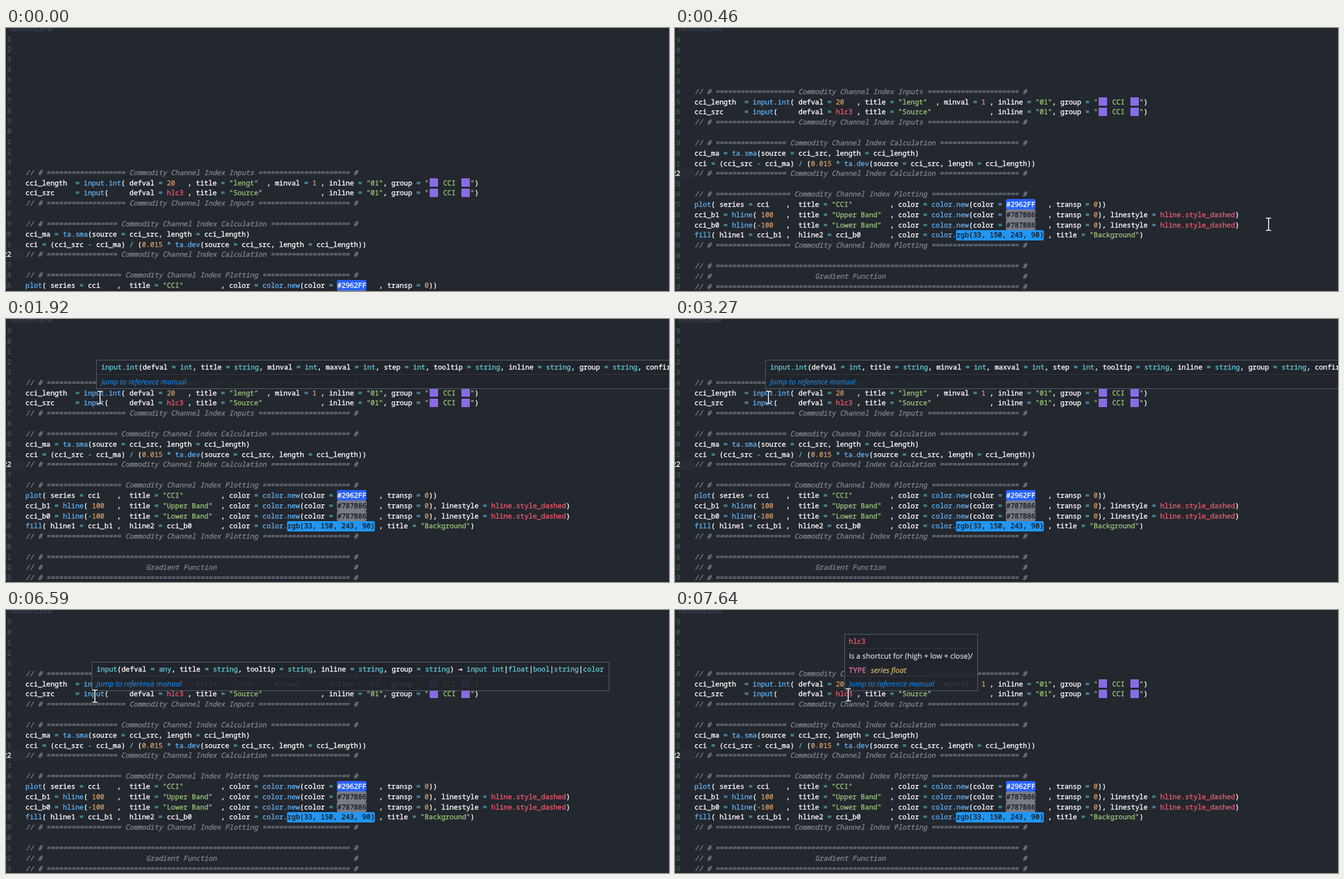
Animation of 1022x406 px, one loop 8 s. Source, as an HTML page:

```html
<!DOCTYPE html>
<html lang="en">
<head>
<meta charset="utf-8">
<title>Editor hover hints</title>
<style>
  html, body { margin: 0; width: 100%; height: 100%; overflow: hidden; background: #23272e; }
  svg { display: block; width: 100vw; height: 100vh; }
  text { white-space: pre; text-rendering: geometricPrecision; }
  .mono { font: 10.683px "Noto Sans Mono", "DejaVu Sans Mono", monospace; stroke-width: .32px; }
  .ui { font: 11.4px "Open Sans", "Noto Sans", sans-serif; stroke-width: .15px; }
  .italic { font-style: italic; }
  .link { font-size: 11.5px; font-style: italic; }
  .strong { font-weight: 600; }
  .arrow { font-family: "DejaVu Sans Mono", monospace; }
</style>
</head>
<body>
<svg viewBox="0 0 1022 406" xmlns="http://www.w3.org/2000/svg">
  <defs><clipPath id="pane"><rect y="10" width="1022" height="396"/></clipPath></defs>
  <rect width="1022" height="406" fill="#23272e"/>
  <text class="ui" x="5" y="5" style="font-size:10.1px" fill="#465068">functions.pine</text>
  <g clip-path="url(#pane)"><g id="code"></g></g>
  <g id="hints"></g>
  <g id="cursor">
    <path d="M-4-9.5H-1.2L0-8.6 1.2-9.5H4M0-8.6V8.6M-4 9.5H-1.2L0 8.6 1.2 9.5H4" fill="none" stroke="#14171b" stroke-width="3.2"/>
    <path d="M-4-9.5H-1.2L0-8.6 1.2-9.5H4M0-8.6V8.6M-4 9.5H-1.2L0 8.6 1.2 9.5H4" fill="none" stroke="#fff" stroke-width="1.5"/>
  </g>
</svg>
<script>
const CHAR = 6.41, LINE = 15.84, LEFT = 30, LOOP = 8000, TICK = 200 / 3;
const C = {
  plain: '#ffffff', op: '#56b6c2', fn: '#61afef', num: '#d19a66', str: '#98c379',
  red: '#ef596f', comment: '#7f848e', gutter: '#495162', link: '#1480e4', type: '#62c6d4'
};
const $ = id => document.getElementById(id);
const nbsp = s => s.replace(/ /g, '\u00a0');
const rowY = row => 98 + (row - 14) * LINE;

// Text sits on whole-pixel baselines; a hairline stroke gives it screen-font weight.
const text = (x, y, s, fill, cls = 'mono') =>
  `<text class="${cls}" x="${x.toFixed(2)}" y="${Math.round(y + 3.7)}" fill="${fill}" stroke="${fill}">${nbsp(s)}</text>`;
const box = (x, y, w, h, fill, rx) =>
  `<rect x="${x.toFixed(2)}" y="${Math.round(y)}" width="${w.toFixed(2)}" height="${h}" rx="${rx}" fill="${fill}"/>`;

// Each rule: pattern, text colour, optional swatch colour for the token.
const codeRules = [
  [/^"[^"]*"?/, C.str],
  [/^#2962FF/, '#ffffff', '#2962ff'],
  [/^#787B86/, '#15181c', '#787b86'],
  [/^rgb\([^)]*\)/, '#15181c', '#2196f3'],
  [/^(hlc3|hline\.style_dashed)/, C.red],
  [/^color\.(?=rgb)/, C.fn],
  [/^(\w+\.)?[a-z]+(?=\()/, C.fn],
  [/^[a-z_]\w*/, C.plain],
  [/^[\d.]+/, C.num],
  [/^[=+*\/-]/, C.op],
  [/^( +|.)/, C.plain]
];
const hintRules = [
  [/^\w+(?= =)/, C.plain],
  [/^([\w.]+|=)/, C.type],
  [/^( +|.)/, C.plain]
];

function highlight(src, x, y, rules) {
  let out = '', col = 0;
  while (col < src.length) {
    const rest = src.slice(col);
    const [pattern, color, swatch] = rules.find(r => r[0].test(rest));
    const token = rest.match(pattern)[0];
    if (swatch) out += box(x + col * CHAR - 0.7, y - 8, token.length * CHAR + 0.7, 16, swatch, 2.5);
    if (token.trim()) out += text(x + col * CHAR, y, token, color, token === '→' ? 'mono arrow' : 'mono');
    col += token.length;
  }
  return out;
}

function banner(title) {
  const left = Math.floor((71 - title.length) / 2) - 1;
  return `// # ${'='.repeat(left)} ${title} ${'='.repeat(71 - title.length - left)} #`;
}
const rule = `// # ${'='.repeat(73)} #`;
const inputs = banner('Commodity Channel Index Inputs');
const calculation = banner('Commodity Channel Index Calculation');
const plotting = banner('Commodity Channel Index Plotting');

const lines = {
  14: inputs,
  15: 'cci_length  = input.int( defval = 20   , title = "lengt"  , minval = 1 , inline = "01", group = "',
  16: 'cci_src     = input(     defval = hlc3 , title = "Source"              , inline = "01", group = "',
  17: inputs,
  19: calculation,
  20: 'cci_ma = ta.sma(source = cci_src, length = cci_length)',
  21: 'cci = (cci_src - cci_ma) / (0.015 * ta.dev(source = cci_src, length = cci_length))',
  22: calculation,
  24: plotting,
  25: 'plot( series = cci    ,  title = "CCI"         , color = color.new(color = #2962FF   , transp = 0))',
  26: 'cci_b1 = hline( 100   ,  title = "Upper Band"  , color = color.new(color = #787B86   , transp = 0), linestyle = hline.style_dashed)',
  27: 'cci_b0 = hline(-100   ,  title = "Lower Band"  , color = color.new(color = #787B86   , transp = 0), linestyle = hline.style_dashed)',
  28: 'fill( hline1 = cci_b1 ,  hline2 = cci_b0       , color = color.rgb(33, 150, 243, 90) , title = "Background")',
  29: plotting,
  31: rule,
  32: '// #' + 'Gradient Function'.padStart(42).padEnd(75) + '#',
  33: rule
};

// Tail of the two input lines: purple squares around the group name.
function groupTail(y) {
  const at = col => LEFT + col * CHAR;
  return box(653, y - 6.5, 13, 13, '#886ce4', 1) + text(at(100.45), y, 'CCI', C.str) +
    box(702, y - 6.5, 13, 13, '#886ce4', 1) + text(at(107), y, '"', C.str) + text(at(108), y, ')', C.plain);
}

function buildCode() {
  let out = box(0, rowY(22) - 7.9, 29, 15.8, '#272b33', 0);
  for (let row = 1; row <= 34; row++) {
    const y = rowY(row), label = String(row), src = lines[row] || '';
    out += text(8.2 - label.length * CHAR, y, label, row === 22 ? C.plain : C.gutter);
    if (src.startsWith('//')) out += text(LEFT, y, src, C.comment, 'mono italic');
    else out += highlight(src, LEFT, y, codeRules);
    if (row === 15 || row === 16) out += groupTail(y);
  }
  return out;
}

function panel(x, y, w, h, dividers, body) {
  const seams = dividers.map(d => `<path d="M${x} ${y + d}h${w}" stroke="#2f353f"/>`).join('');
  return `<g><rect x="${x}" y="${y}" width="${w}" height="${h}" fill="#21252b" fill-opacity=".92"/>${seams}` +
    `<rect x="${x}" y="${y}" width="${w}" height="${h}" fill="none" stroke="#515a69"/>${body}` +
    text(x + 7, y + h - 10.2, 'Jump to reference manual', C.link, 'ui link') + '</g>';
}
const signature = (x, y, w, src) =>
  panel(x, y, w, 44, [22], highlight(src, x + 7, y + 10.7, hintRules));

const hints = [
  { from: 1860, full: 1920, to: 3410, svg: signature(139.5, 63.5, 1000,
    'input.int(defval = int, title = string, minval = int, maxval = int, step = int, tooltip = string, inline = string, group = string, confirm = bool) → input int') },
  { from: 3790, full: 3870, to: 6730, svg: signature(132.5, 80.5, 797,
    'input(defval = any, title = string, tooltip = string, inline = string, group = string) → input int|float|bool|string|color') },
  { from: 7580, full: 7640, to: LOOP, svg: panel(261.5, 37.5, 205, 87, [22, 65],
    text(268, 48, 'hlc3', C.red) +
    text(268, 71, 'Is a shortcut for (high + low + close)/', '#e4e6ea', 'ui') +
    text(268, 93, 'TYPE', '#d06c98', 'ui strong') +
    text(302, 93, 'series float', '#e5c07b', 'ui italic')) }
];

// Pointer path: tick, x, y.
const path = [
  [2, 964, 440], [4, 960, 395], [7, 915, 303], [8, 860, 262], [10, 640, 150], [12, 400, 62],
  [14, 245, 24], [15, 215, 18], [17, 175, 42], [19, 151, 96], [21, 151, 96], [22, 147, 112],
  [23, 145, 121], [48, 145, 121], [49, 144, 121], [50, 144, 121], [51, 140, 128], [52, 136, 132],
  [98, 136, 132], [99, 137, 133], [102, 165, 144], [106, 245, 138], [108, 267, 131], [130, 267, 131]
];
function pointerAt(tick) {
  if (tick <= path[0][0]) return path[0].slice(1);
  const i = path.findIndex(k => k[0] >= tick);
  const [t0, x0, y0] = path[i - 1], [t1, x1, y1] = path[i];
  const p = (tick - t0) / (t1 - t0);
  return [x0 + (x1 - x0) * p, y0 + (y1 - y0) * p];
}

$('code').innerHTML = buildCode();
$('hints').innerHTML = hints.map(h => h.svg).join('');
const hintNodes = [...$('hints').children];

function render(t) {
  const tick = Math.floor((t + 10) / TICK);
  const p = Math.min(1, Math.max(0, (tick - 1) / 5));
  $('code').setAttribute('transform', `translate(0 ${Math.round(125 * (1 - p) ** 2)})`);
  const [x, y] = pointerAt(tick);
  $('cursor').setAttribute('transform', `translate(${x.toFixed(1)} ${y.toFixed(1)})`);
  hints.forEach((h, i) => {
    const shown = t >= h.from && t < h.to;
    hintNodes[i].setAttribute('opacity', !shown ? 0 : t < h.full ? 0.5 : 1);
  });
}

const start = performance.now();
function loop() {
  render((performance.now() - start) % LOOP);
  requestAnimationFrame(loop);
}
loop();
</script>
</body>
</html>
```
